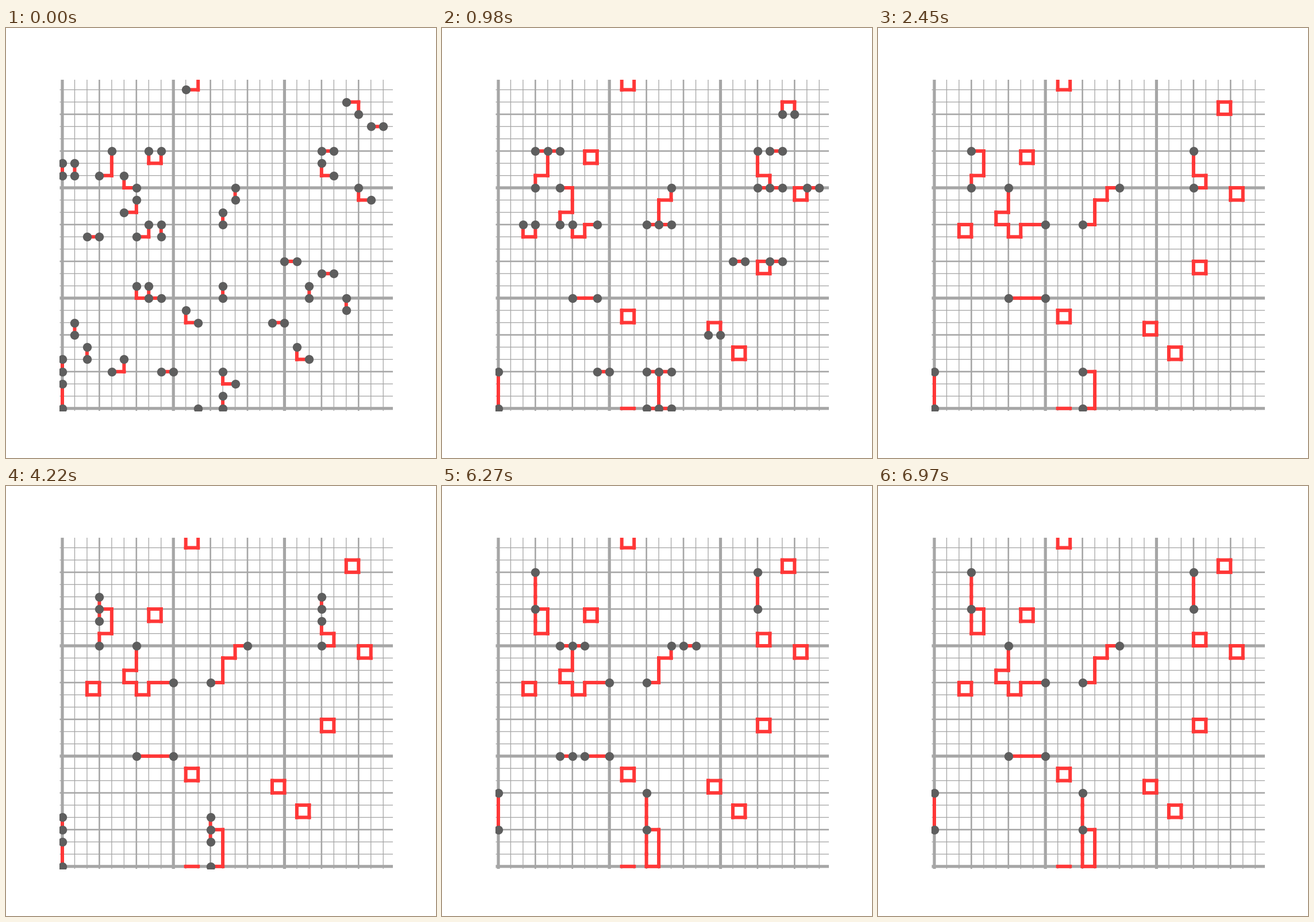
Recreate the animation shown at these times as a matplotlib script. Size 748 by 748 pixels, loop 8 s.

```python
import matplotlib.pyplot as plt
from matplotlib.animation import FuncAnimation
from matplotlib.collections import LineCollection
from matplotlib.patches import Rectangle

SIZE, DPI, N = 748, 100, 27
PX = 72 / DPI
X0, Y0, DX, DY = 98, 661.75, 21.47, 21.32
LEFT, RIGHT, TOP, BOTTOM = 93.5, 673, 90, 666
GREY, RED, DARK = "#a6a6a6", "#ff3737", "#5e5e5e"
LOOP, TICK, STEP = 8000, 20, 70
H, V = 0, 1


def pos(i, j):
    return X0 + DX * i, Y0 - DY * j


def step(site, axis, k):
    """The site k places along an axis; the grid wraps round."""
    i, j = site
    return ((i + k) % N, j) if axis == H else (i, (j + k) % N)


def run(sites, axis, *spans):
    """Unit edges from offset a to offset b of every site."""
    return [(axis, *step(s, axis, k))
            for s in sites for a, b in spans for k in range(a, b)]


def corners(edges):
    """Sites touched by an odd number of edges."""
    odd = set()
    for axis, i, j in edges:
        odd ^= {(i, j)}
        odd ^= {step((i, j), axis, 1)}
    return odd


events = []
now = set()


def flip(t, edges):
    events.append((t, edges))
    for e in edges:
        now.symmetric_difference_update({e})


def sites(axis, rest, cell=3):
    return [s for s in sorted(corners(now)) if s[axis] % cell == rest]


def match_pairs(t, axis):
    """Join neighbours that face each other across a cell border."""
    nodes = corners(now)
    flip(t, run([s for s in sites(axis, 1) if step(s, axis, 1) in nodes],
                axis, (0, 1)))


def match_corners(t):
    """Join diagonal neighbours where four cells meet: across, then along."""
    nodes = corners(now)
    across, along = [], []
    for i, j in sites(H, 1):
        if j % 3 == 1 and (i + 1, j + 1) in nodes:
            across.append((i, j + 1))
            along.append((i, j))
        if j % 3 == 2 and (i + 1, j - 1) in nodes:
            across.append((i, j))
            along.append((i + 1, j - 1))
    flip(t, run(across, H, (0, 1)))
    flip(t + STEP, run(along, V, (0, 1)))


def centre(out, back, axis, rest):
    """Spread to both sides, then drop the half away from the cell centre."""
    moving = sites(axis, rest)
    flip(out, run(moving, axis, (-1, 1)))
    flip(back, run(moving, axis, (0, 1) if rest == 1 else (-1, 0)))


def probe(t, back, axis):
    """Large cells: reach out, then draw back in reverse."""
    low, high = sites(axis, 6, 9), sites(axis, 3, 9)
    grow = [[(-k, 1 - k), (k - 1, k)] for k in (1, 2, 3)]
    stages = [run(low, axis, *g) for g in grow] + [[], []]
    reach = grow[:2] + [[(2, 3)], [(3, 4)]]
    for k, spans in enumerate(reach, 1):
        stages[k] = stages[k] + run(high, axis, *spans)
    for k, edges in enumerate(stages):
        flip(t + k * STEP, edges)
    for k, edges in enumerate(reversed(stages)):
        flip(back + k * STEP, edges)


def stretch(t, axis):
    """Large cells: spread three places up, then three places down."""
    moving = sites(axis, 3, 9)
    for k, span in enumerate([(-1, 1), (1, 2), (2, 3), (-2, -1), (-3, -2)]):
        flip(t + k * STEP, run(moving, axis, span))


# starting errors: single edges, and elbows that turn up at their corner
bars = [(25, 23), (23, 25), (21, 21), (2, 14), (18, 12), (21, 11), (17, 7),
        (8, 3)]
posts = [(24, 24), (0, 19), (1, 19), (4, 20), (8, 20), (14, 17), (13, 15),
         (8, 14), (13, 9), (20, 9), (23, 8), (1, 6), (2, 4), (0, 3), (0, 1),
         (0, 0), (13, 0)]
from_right = [(7, 20), (21, 19), (5, 18), (24, 17), (6, 9), (7, 9), (10, 7),
              (19, 4), (13, 2)]
from_left = [(11, 26), (4, 19), (6, 16), (7, 14), (5, 3)]
flip(0, run(bars + from_right, H, (0, 1)) + run(from_left, H, (-1, 0))
     + run(posts + from_right + from_left, V, (0, 1)))

# small cells
match_corners(70)
match_pairs(210, V)
centre(280, 350, V, 1)
match_pairs(420, H)
centre(490, 560, V, 2)
match_pairs(700, H)
centre(980, 1190, H, 1)
centre(1120, 1330, H, 2)

# large cells
probe(1750, 2170, V)
stretch(4220, V)
probe(6270, 6690, H)


def state(t):
    edges = set()
    for when, flips in events:
        if when <= t:
            for e in flips:
                edges ^= {e}
    return edges


fig = plt.figure(figsize=(SIZE / DPI, SIZE / DPI), dpi=DPI, facecolor="white")
ax = fig.add_axes([0, 0, 1, 1])
ax.set_xlim(0, SIZE)
ax.set_ylim(SIZE, 0)
ax.axis("off")
window = Rectangle((LEFT, TOP), RIGHT - LEFT, BOTTOM - TOP,
                   transform=ax.transData)

grid, widths = [], []
for k in range(N):
    x, y = pos(k, k)
    grid += [[(x, TOP), (x, BOTTOM)], [(LEFT, y), (RIGHT, y)]]
    w = 5.2 if k % 9 == 0 else 2.6 if k % 3 == 0 else 1.3
    widths += [w * PX] * 2
lattice = LineCollection(grid, colors=GREY, linewidths=widths, zorder=1)
chains = LineCollection([], colors=RED, linewidths=6 * PX,
                        capstyle="projecting", zorder=2)
for c in (lattice, chains):
    ax.add_collection(c, autolim=False)
dots, = ax.plot([], [], "o", color=DARK, ms=15.4 * PX, mew=0, zorder=3)
for artist in (lattice, chains, dots):
    artist.set_clip_path(window)
    artist.set_snap(False)


def draw(frame):
    edges = sorted(state(frame * TICK + TICK / 2))
    chains.set_segments([
        [pos(i, j), pos(i + (axis == H), j + (axis == V))]
        for axis, i, j in edges])
    pts = [pos(*s) for s in sorted(corners(edges))]
    dots.set_data([p[0] for p in pts], [p[1] for p in pts])
    return chains, dots


anim = FuncAnimation(fig, draw, frames=LOOP // TICK, interval=TICK,
                     init_func=lambda: draw(0), repeat=True, repeat_delay=0)
plt.show()
```
